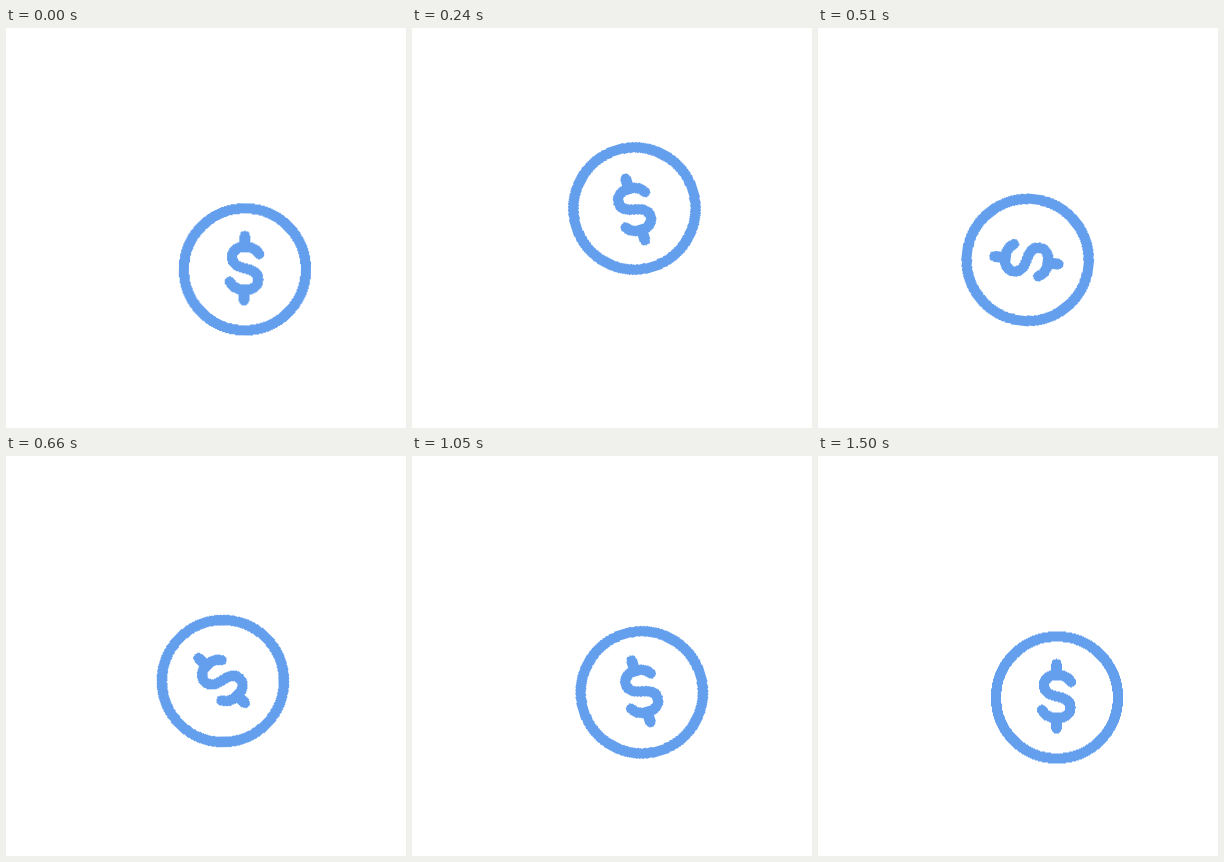
Animation of 400 by 400 pixels, one loop 1530 ms. Source, as an HTML page without scripts:

```html
<!DOCTYPE html>
<html lang="en">
<head>
<meta charset="utf-8">
<title>Coin toss</title>
<style>
  html, body { margin: 0; width: 100%; height: 100%; overflow: hidden; background: #fff; }
  svg { display: block; width: 100%; height: 100%; }

  .coin {
    fill: none;
    stroke: #649fee;
    stroke-width: 10.3;
    stroke-linecap: round;
    stroke-linejoin: round;
    shape-rendering: crispEdges;
  }

  .drift, .bounce, .spin {
    --rise: cubic-bezier(.333, .667, .667, 1);
    --fall: cubic-bezier(.333, 0, .667, .333);
    animation: 1530ms linear infinite;
  }
  .drift { animation-name: drift; }
  .bounce { animation-name: bounce; }
  .spin { animation-name: spin; transform-origin: 0 0; }

  /* Thrown to the left, then rolling back to the right */
  @keyframes drift {
    0% { transform: translateX(0); animation-timing-function: cubic-bezier(.333, .463, .667, .797); }
    34.64% { transform: translateX(-30px); }
    43.14% { transform: translateX(-22.1px); }
    54.9% { transform: translateX(-13.9px); }
    78.43% { transform: translateX(-5.8px); }
    98.04%, 100% { transform: translateX(0); }
  }

  /* Each hop is lower than the last */
  @keyframes bounce {
    0% { transform: translateY(0); animation-timing-function: var(--rise); }
    15.69% { transform: translateY(-61px); animation-timing-function: cubic-bezier(.42, 0, .75, .36); }
    34.64% { transform: translateY(0); animation-timing-function: var(--rise); }
    44.77% { transform: translateY(-16.7px); animation-timing-function: var(--fall); }
    54.9% { transform: translateY(0); animation-timing-function: var(--rise); }
    66.67% { transform: translateY(-6.7px); animation-timing-function: var(--fall); }
    78.43% { transform: translateY(0); animation-timing-function: var(--rise); }
    88.24% { transform: translateY(-1.3px); animation-timing-function: var(--fall); }
    98.04%, 100% { transform: translateY(0); }
  }

  /* One full turn, slowing down */
  @keyframes spin {
    0% { transform: rotate(0); animation-timing-function: cubic-bezier(.333, .463, .667, .797); }
    27.45% { transform: rotate(243deg); }
    34.64% { transform: rotate(284deg); }
    43.14% { transform: rotate(314deg); }
    56.86% { transform: rotate(333deg); }
    80.39% { transform: rotate(353deg); }
    98.04%, 100% { transform: rotate(360deg); }
  }
</style>
</head>
<body>
<svg viewBox="0 0 400 400">
  <g class="coin" transform="translate(239 241.5)">
    <g class="drift">
      <g class="bounce">
        <g class="spin">
          <circle r="61"/>
          <path d="M14-15.5C11.5-20 6.5-22.5 0-22.5C-8-22.5-13-18.5-13-12C-13-5.5-7-2.5 0-1C8 .8 13.5 3 13.5 10C13.5 17 8 20.5 0 20.5C-7 20.5-12.5 17.5-15 12.5"/>
          <path d="M-.5-33.5V-22.5M-.5 20.5V31"/>
        </g>
      </g>
    </g>
  </g>
</svg>
</body>
</html>
```
